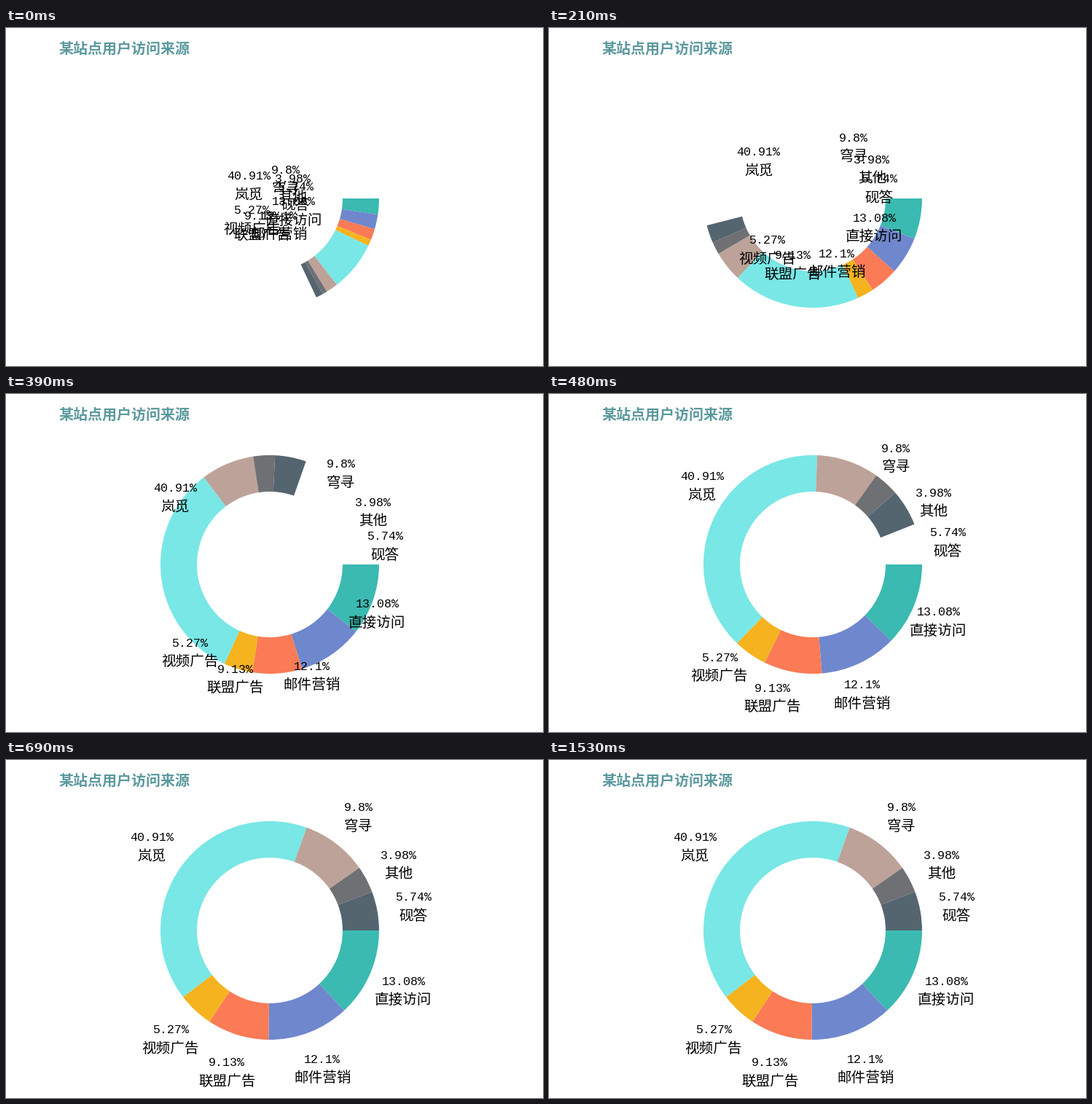
These frames come from a looping animation (737 by 464 pixels, 2250 ms). A matplotlib script:

```python
import numpy as np
import matplotlib.pyplot as plt
from matplotlib.animation import FuncAnimation
from matplotlib.patches import Polygon, Wedge

W, H, DPI = 737, 464, 64
FRAMES, STEP_MS = 75, 30
CX, CY = 362, 234
R_OUT, RING, R_LABEL = 150, 50, 200
CJK = "Noto Sans CJK JP"

SLICES = [
    ("直接访问", 13.08, "#3abab0"),
    ("邮件营销", 12.1, "#6f87cd"),
    ("联盟广告", 9.13, "#fa7b55"),
    ("视频广告", 5.27, "#f5b31f"),
    ("岚觅", 40.91, "#78e7e6"),
    ("穹寻", 9.8, "#bda299"),
    ("其他", 3.98, "#6e7074"),
    ("砚答", 5.74, "#546570"),
]

# Growth of the ring: frame, fraction, speed per frame
GROWTH = np.array([
    (0, 0.180, 0.030),
    (5, 0.366, 0.044),
    (10, 0.623, 0.058),
    (14, 0.861, 0.055),
    (16, 0.940, 0.018),
    (18, 0.957, 0.0085),
    (23, 1.000, 0.008),
])

POINTER = np.array([(0.5, 0.5), (0.5, 16.5), (4, 13.2), (6.6, 18.8),
                    (9, 17.8), (6.5, 12.2), (11.5, 12)])
POINTER_FROM, POINTER_TO = np.array([65, 249]), np.array([601, 450])
POINTER_START, POINTER_FRAMES = 47, 4


def pt(px):
    return px * 72 / DPI


def growth(frame):
    """Cubic Hermite curve through the growth keys."""
    if frame >= GROWTH[-1, 0]:
        return 1.0
    i = np.searchsorted(GROWTH[:, 0], frame, side="right") - 1
    (f0, s0, v0), (f1, s1, v1) = GROWTH[i], GROWTH[i + 1]
    span = f1 - f0
    t = (frame - f0) / span
    return (s0 * (1 + 2 * t) * (1 - t) ** 2 + s1 * t * t * (3 - 2 * t)
            + span * t * (1 - t) * (v0 * (1 - t) - v1 * t))


fig = plt.figure(figsize=(W / DPI, H / DPI), dpi=DPI, facecolor="white")
ax = fig.add_axes([0, 0, 1, 1])
ax.set_xlim(0, W)
ax.set_ylim(H, 0)
ax.axis("off")

ax.text(72, 34.5, "某站点用户访问来源", family=CJK, weight="bold",
        size=pt(20), color="#5b999e")

shares = np.array([share for _, share, _ in SLICES])
edges = 360 * np.concatenate([[0], np.cumsum(shares)]) / shares.sum()
middles = np.radians((edges[:-1] + edges[1:]) / 2)

wedges, labels = [], []
for name, share, color in SLICES:
    wedge = Wedge((CX, CY), R_OUT, 0, 1, width=RING, facecolor=color, linewidth=0)
    wedges.append(ax.add_patch(wedge))
    value = ax.text(0, 0, f"{share:g}%", family="Liberation Mono",
                    size=pt(16.67), ha="center", zorder=3)
    caption = ax.text(0, 0, name, family=CJK, weight="light",
                      size=pt(19.6), ha="center", zorder=3)
    labels.append((value, caption))

pointer = Polygon(POINTER, facecolor="white", edgecolor="black",
                  linewidth=pt(1), zorder=5)
ax.add_patch(pointer)


def draw(frame):
    grown = growth(frame)
    for i, wedge in enumerate(wedges):
        wedge.set_theta1(edges[i] * grown)
        wedge.set_theta2(edges[i + 1] * grown)
        x = CX + R_LABEL * grown * np.cos(middles[i])
        y = CY + R_LABEL * grown * np.sin(middles[i])
        value, caption = labels[i]
        value.set_position((x, y - 5))
        caption.set_position((x, y + 21.5))

    step = frame - POINTER_START
    pointer.set_visible(0 <= step < POINTER_FRAMES)
    way = step / (POINTER_FRAMES - 1)
    pointer.set_xy(POINTER + POINTER_FROM + (POINTER_TO - POINTER_FROM) * way)
    return [*wedges, *(text for pair in labels for text in pair), pointer]


anim = FuncAnimation(fig, draw, frames=FRAMES, interval=STEP_MS,
                     repeat=True, repeat_delay=0, blit=False)
plt.show()
```
